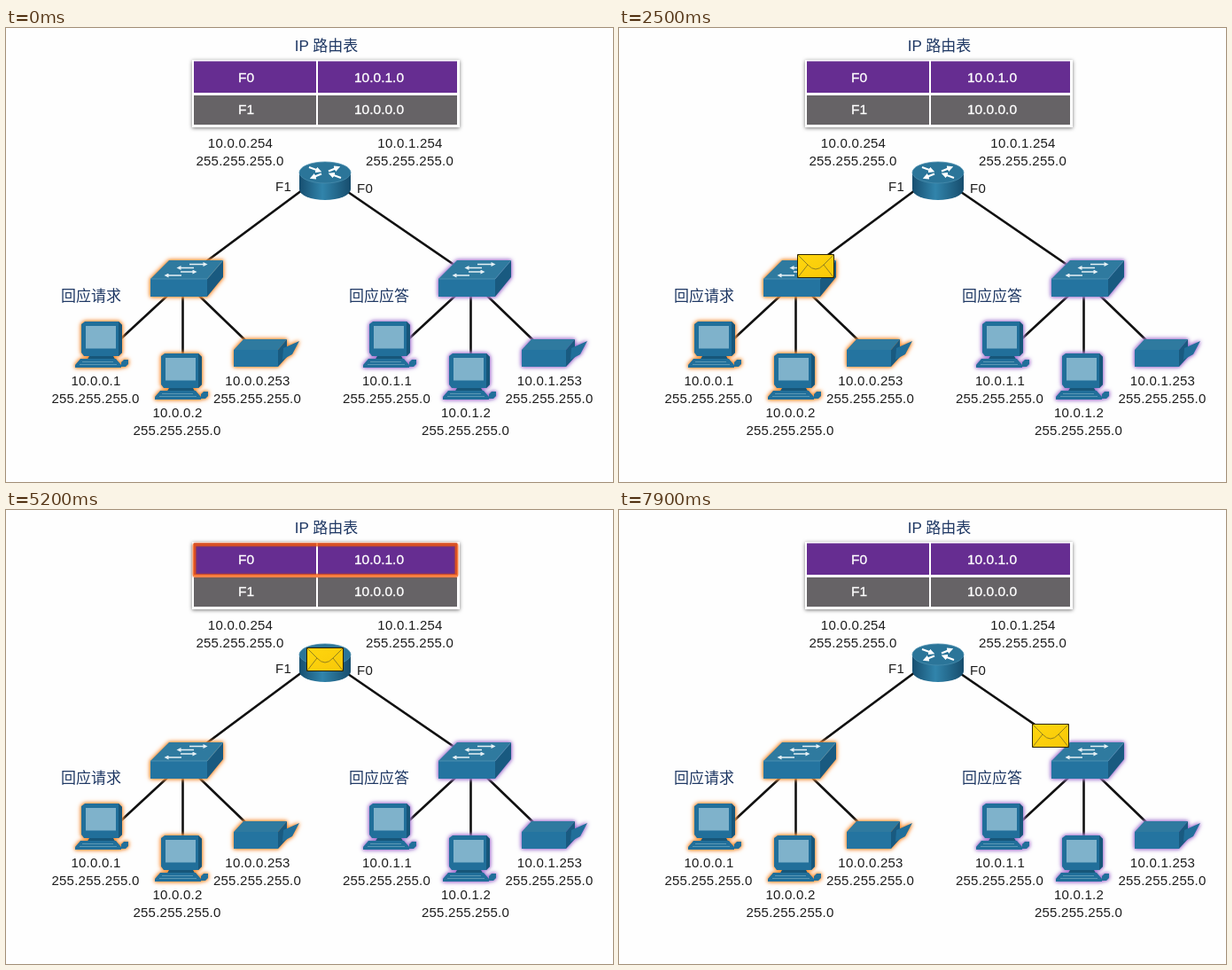
An HTML page that plays this animation: 685 by 512 pixels, repeating every 8 s.

```html
<!DOCTYPE html>
<html lang="zh">
<head>
<meta charset="utf-8">
<style>
html, body { margin: 0; width: 100%; height: 100%; overflow: hidden; background: #fefefe; }
svg { display: block; width: 685px; height: 512px; }
text { font: 15px "Liberation Sans", "Noto Sans CJK SC", sans-serif; letter-spacing: .25px; text-anchor: middle; fill: #1c1c1c; }
.head { font-size: 17px; letter-spacing: 0; fill: #1f3864; }
.cell { font-size: 15.5px; letter-spacing: 0; fill: #fff; stroke: #fff; stroke-width: .35; }
.table { filter: drop-shadow(0 1px 2px #777); }
.orange { filter: drop-shadow(0 0 2.2px #ff8a2a) drop-shadow(0 0 2px #ffa860); }
.purple { filter: drop-shadow(0 0 2.2px #9c68cc) drop-shadow(0 0 2px #bd98dd); }
.wire { stroke: #111; stroke-width: 2.6; fill: none; }
.arrow { stroke: #fff; stroke-width: 2; fill: none; }
.thin { stroke: #e6f0f5; stroke-width: 1.5; }
</style>
</head>
<body>
<svg viewBox="0 0 685 512">
  <defs>
    <linearGradient id="drum">
      <stop offset="0" stop-color="#174f70"/><stop offset=".45" stop-color="#3184ab"/><stop offset="1" stop-color="#174d6d"/>
    </linearGradient>
    <linearGradient id="gold" x2="1" y2="1">
      <stop offset="0" stop-color="#ffd60e"/><stop offset="1" stop-color="#f8c808"/>
    </linearGradient>
    <marker id="tip" viewBox="0 0 6 6" refX="3" refY="3" markerWidth="7" markerHeight="7"
            markerUnits="userSpaceOnUse" orient="auto"><path d="M0 0L6 3L0 6z" fill="#fff"/></marker>
    <marker id="dart" viewBox="0 0 6 6" refX="3" refY="3" markerWidth="6" markerHeight="5"
            markerUnits="userSpaceOnUse" orient="auto"><path d="M0 0L6 3L0 6z" fill="#e6f0f5"/></marker>
    <g id="pc">
      <path fill="#216f9a" d="M85 334L89 331H127L131 335V366L127 370H88L85 366z"/>
      <path fill="#175679" d="M127 331L131 335V366L127 370z"/>
      <path fill="#7fb2cb" d="M90 336H124V361.5H90z"/>
      <path fill="#175679" d="M94 370H121L124 375H91z"/>
      <path fill="#216f9a" d="M84 373H124L130 380V383H78V380z"/>
      <path stroke="#6aa3bd" stroke-width=".8" d="M86 376.5H121M83 379.5H125"/>
      <path fill="#216f9a" d="M130 377L133 374H138V379L135 382H130z"/>
    </g>
    <g id="switch">
      <path fill="#2f7a9f" d="M163 283L184 262H245L227 283z"/>
      <path fill="#2474a0" d="M163 283H227V303H163z"/>
      <path fill="#195a80" d="M227 283L245 262V281L227 303z"/>
      <path stroke="#5595b5" stroke-width=".8" d="M163 283H227L245 262" fill="none"/>
      <g class="thin" marker-end="url(#dart)">
        <path d="M207 266.5H225"/>
        <path d="M212 270.5H195"/>
        <path d="M197 275H213"/>
        <path d="M198 279H181"/>
      </g>
    </g>
    <g id="printer">
      <path fill="#2f7a9f" d="M257 363L268 351H317L307 363z"/>
      <path fill="#2474a0" d="M257 363H307V382H257z"/>
      <path fill="#195a80" d="M307 363L317 351V371L307 382z"/>
      <path fill="#216f9a" d="M313 361L331 353L323 368L312 374z"/>
    </g>
    <g id="site">
      <use href="#switch"/><use href="#pc"/><use href="#pc" x="90" y="36"/><use href="#printer"/>
    </g>
    <path id="legs" class="wire" d="M182 302L129 351M199.5 302V368M218 302L272 354"/>
  </defs>

  <path class="table" fill="#fff" d="M210 36H512V112H210z"/>
  <path fill="#662d91" d="M212 37.5H350V73H212zM352 37.5H509V73H352z"/>
  <path fill="#666366" d="M212 76H350V109H212zM352 76H509V109H352z"/>
  <rect id="mark" x="212.5" y="39" width="296" height="35" rx="1" fill="none" stroke="#f85a08"
        stroke-width="3.4" style="filter:drop-shadow(0 0 1px #c84a10)"/>
  <g id="labels"></g>

  <path class="wire" d="M334 183L225 264M386 185L510 270"/>
  <use href="#legs"/><use href="#legs" x="325"/>
  <path fill="url(#drum)" d="M331 163V182A29 12 0 0 0 389 182V163z"/>
  <ellipse cx="360" cy="163" rx="29" ry="12" fill="#2b7599" stroke="#4a8dae" stroke-width=".8"/>
  <g class="arrow" marker-end="url(#tip)">
    <path d="M342 157L353 161"/>
    <path d="M364 161.5L374 157.5"/>
    <path d="M356 164.5L346 168.5"/>
    <path d="M378 169L367 165"/>
  </g>
  <g class="orange"><use href="#site"/></g>
  <g class="purple"><use href="#site" x="325"/></g>

  <g id="mail">
    <path fill="url(#gold)" stroke="#2b2400" stroke-width="1" d="M.5.5H41.5V26.5H.5z"/>
    <path fill="none" stroke="#94801e" stroke-width="1" d="M1 1L12 12Q21 22 30 12L41 1M1 26L12 12M41 26L30 12"/>
  </g>
</svg>
<script>
const $ = id => document.getElementById(id);

function label(x, y, str, cls = "") {
  const el = document.createElementNS("http://www.w3.org/2000/svg", "text");
  el.setAttribute("x", x);
  el.setAttribute("y", y);
  el.setAttribute("class", cls);
  el.textContent = str;
  $("labels").append(el);
}
function host(x, y, ip) {
  label(x, y, ip);
  label(x - .5, y + 20, "255.255.255.0");
}
label(361.5, 26, "IP 路由表", "head");
label(96, 308, "回应请求", "head");
label(421, 308, "回应应答", "head");
label(271, 61, "F0", "cell");
label(421, 61, "10.0.1.0", "cell");
label(271, 97, "F1", "cell");
label(421, 97, "10.0.0.0", "cell");
label(313, 184, "F1");
label(405, 186, "F0");
host(264.5, 135, "10.0.0.254");
host(456, 135, "10.0.1.254");
host(101.5, 403, "10.0.0.1");
host(193.5, 439, "10.0.0.2");
host(284, 403, "10.0.0.253");
host(430, 403, "10.0.1.1");
host(519, 439, "10.0.1.2");
host(613.5, 403, "10.0.1.253");

// progress from 0 to 1 between two times
const ramp = (t, a, b) => Math.min(1, Math.max(0, (t - a) / (b - a)));

// [start, end, dx, dy]
const moves = [[812, 1400, 95, -73], [2393, 3268, 157, -114], [7200, 8130, 169, 114]];

function mailAlpha(t) {
  if (t < 1400) return ramp(t, 560, 810);
  if (t < 3000) return Math.abs(ramp(t, 1400, 2400) * 2 - 1);
  return 1 - ramp(t, 3300, 3800) + ramp(t, 3900, 4400);
}

// five half-waves, ending fully lit
function markAlpha(t) {
  const wave = (1 - Math.cos(ramp(t, 3850, 6350) * 5 * Math.PI)) / 2;
  return wave * (1 - ramp(t, 7000, 7200));
}

function draw(now) {
  const t = Math.floor(now % 8000 / 100) * 100;
  let x = 87, y = 342;
  for (const [a, b, dx, dy] of moves) {
    x += dx * ramp(t, a, b);
    y += dy * ramp(t, a, b);
  }
  $("mail").setAttribute("transform", `translate(${Math.round(x)} ${Math.round(y)})`);
  $("mail").setAttribute("opacity", mailAlpha(t));
  $("mark").setAttribute("opacity", markAlpha(t));
}

let start;
function tick(now) {
  start ??= now;
  draw(now - start);
  requestAnimationFrame(tick);
}
draw(0);
requestAnimationFrame(tick);
</script>
</body>
</html>
```
